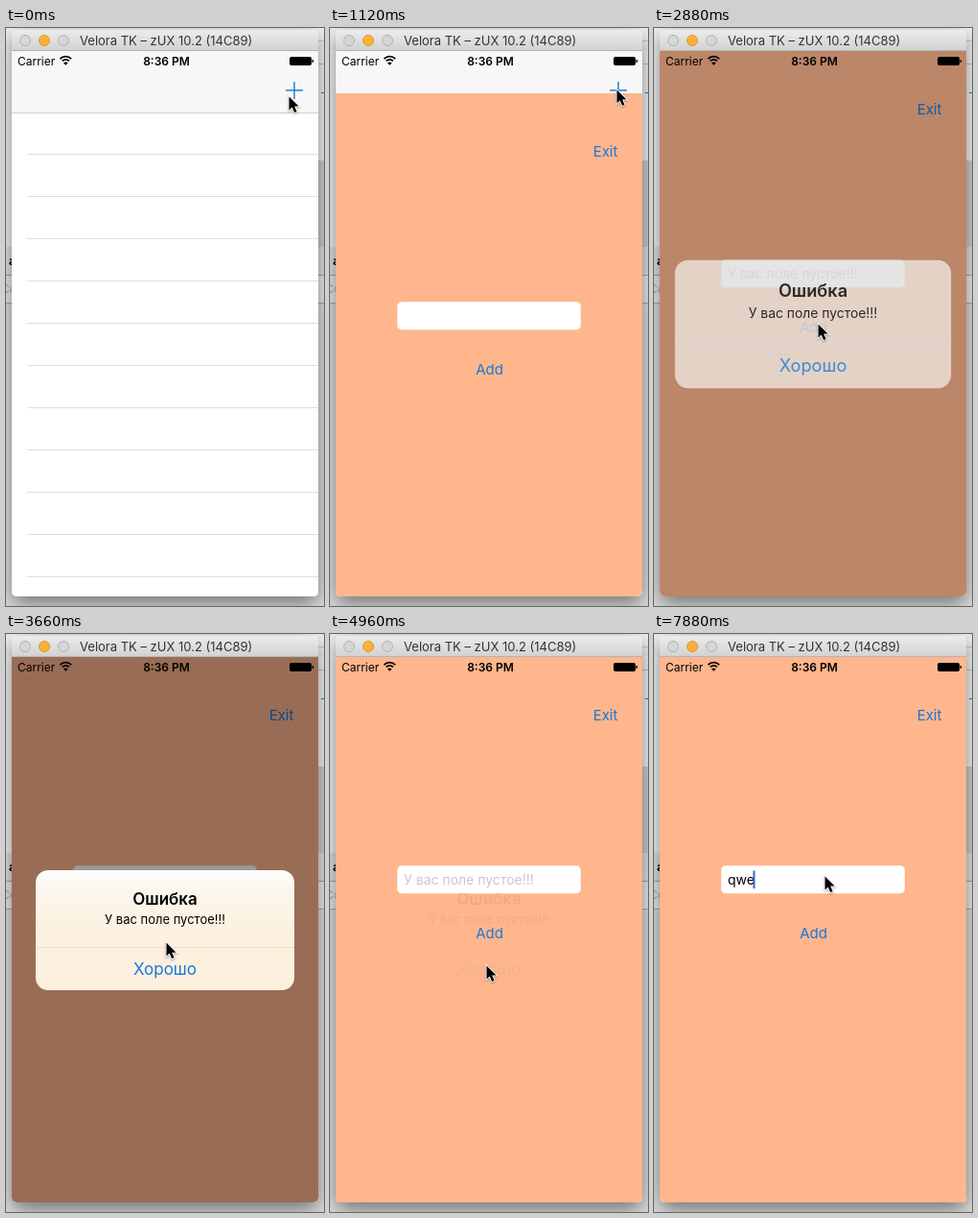
An HTML page with a canvas for the animation above (8000 ms loop, 332 px wide and 602 px high).

```html
<!DOCTYPE html>
<html lang="en">
<head>
<meta charset="utf-8">
<title>Empty field alert</title>
<style>
  html, body { margin: 0; width: 100%; height: 100%; overflow: hidden; }
  canvas { display: block; }
</style>
</head>
<body>
<canvas id="stage" width="332" height="602"></canvas>
<script>
const ctx = document.getElementById('stage').getContext('2d');
const LOOP = 8000;
const BLUE = '#1878d8';
const EMPTY_MESSAGE = 'У вас поле пустое!!!';

// Pointer stops: time, x, y
const POINTER = [
  [40, 295, 71], [140, 299, 64], [1130, 299, 64], [2200, 171, 308],
  [3300, 171, 308], [3660, 167, 321], [4250, 163, 351], [4620, 163, 351],
  [4900, 163, 345], [5100, 163, 345], [6060, 178, 252]
];

const clamp = v => Math.max(0, Math.min(1, v));

// Remaining distance of a critically damped spring released at `start`
function spring(t, start, rate) {
  const x = Math.max(0, t - start) / 1000 * rate;
  return (1 + x) * Math.exp(-x);
}

// Button opacity: dims on press, fades back after release
function pressed(t, down, up) {
  return t < down ? 1 : 0.2 + 0.8 * clamp((t - up) / 400);
}

function rect(x, y, w, h, color) {
  ctx.fillStyle = color;
  ctx.fillRect(x, y, w, h);
}

function rounded(x, y, w, h, r, color) {
  ctx.beginPath();
  ctx.roundRect(x, y, w, h, r);
  ctx.fillStyle = color;
  ctx.fill();
}

function text(str, x, y, size, { color = '#000', weight = 400, align = 'center' } = {}) {
  ctx.font = `${weight} ${size}px Inter, Roboto, sans-serif`;
  ctx.textAlign = align;
  ctx.fillStyle = color;
  ctx.fillText(str, x, y);
}

function gradient(y0, y1, ...colors) {
  const g = ctx.createLinearGradient(0, y0, 0, y1);
  colors.forEach((c, i) => g.addColorStop(i / (colors.length - 1), c));
  return g;
}

function faded(alpha, draw) {
  ctx.save();
  ctx.globalAlpha *= alpha;
  draw();
  ctx.restore();
}

function drawDesktop() {
  rect(0, 0, 332, 602, '#e2e2e2');
  rect(0, 0, 332, 23, '#f0f0f0');
  rect(0, 23, 332, 205, '#f8f8f8');
  rect(0, 228, 332, 30, '#e6e6e6');
  rect(0, 258, 332, 28, '#f0f0f0');
  rect(326, 138, 6, 90, '#d2d2d2');
  for (const y of [257, 286]) rect(0, y, 332, 1, '#aaa');
  for (const y of [13, 37]) rect(326, y, 6, 1, '#c4c4c4');
  rect(329, 67, 3, 1, BLUE);

  ctx.save();
  ctx.shadowColor = 'rgba(0,0,0,.5)';
  ctx.shadowBlur = 22;
  ctx.shadowOffsetY = 8;
  rounded(6, 2, 320, 590, 5, '#fff');
  ctx.restore();
  text('a', 3, 247, 12, { weight: 700, align: 'left' });
  text('Co', -5, 276, 12, { color: '#888', align: 'left' });
}

function drawTitleBar() {
  rect(6, 2, 320, 22, gradient(2, 23, '#ececec', '#d2d2d2'));
  rect(6, 23, 320, 1, '#b4b4b4');
  ['#d6d6d6', '#fbb03b', '#d6d6d6'].forEach((color, i) => {
    ctx.beginPath();
    ctx.arc(20 + 20 * i, 13, 5.5, 0, Math.PI * 2);
    ctx.fillStyle = color;
    ctx.fill();
    ctx.strokeStyle = i === 1 ? '#dc9630' : '#b2b2b2';
    ctx.lineWidth = 1;
    ctx.stroke();
  });
  text('Velora TK – zUX 10.2 (14C89)', 77, 18, 13, { color: '#333', align: 'left' });
}

function drawStatusBar() {
  text('Carrier', 12, 38.5, 12, { align: 'left' });
  text('8:36 PM', 167.5, 38.5, 12, { weight: 600 });

  ctx.strokeStyle = '#000';
  ctx.lineWidth = 1.8;
  for (const r of [5, 8.3]) {
    ctx.beginPath();
    ctx.arc(62.3, 38, r, -Math.PI * 0.75, -Math.PI * 0.25);
    ctx.stroke();
  }
  ctx.beginPath();
  ctx.moveTo(62.3, 38.8);
  ctx.arc(62.3, 38.8, 3.2, -Math.PI * 0.75, -Math.PI * 0.25);
  ctx.fillStyle = '#000';
  ctx.fill();

  rounded(296, 30, 23, 9, 2, '#000');
  rounded(319.5, 33, 1.5, 3, 0.7, '#000');
}

function drawList(t) {
  rect(6, 24, 320, 568, '#fff');
  rect(6, 24, 320, 64, '#f7f7f7');
  rect(6, 88, 320, 1, '#d0d0d0');
  for (let y = 131; y < 592; y += 44) rect(22, y, 304, 1, '#dfdfe1');
  faded(pressed(t, 280, 700), () => {
    rect(292, 64.2, 18, 1.4, BLUE);
    rect(300.3, 56, 1.4, 18, BLUE);
  });
}

function drawField(t) {
  rounded(70, 241, 192, 29.5, 5, '#ffdcc8');
  rounded(70.5, 241.5, 191, 28.5, 4.5, '#fff');

  const typed = 'qwe'.slice(0, Math.max(0, Math.ceil((t - 7639) / 80)));
  if (typed) text(typed, 77, 260.5, 14, { align: 'left' });
  else if (t >= 2655) text(EMPTY_MESSAGE, 77, 260.5, 14, { color: '#c7c7cd', align: 'left' });

  if (t >= 6500) {
    const caretX = 77 + (typed ? ctx.measureText(typed).width - 1.5 : 0);
    const alpha = typed ? 1 : 1 - clamp((t - 7000) / 240);
    faded(alpha, () => rect(caretX, 246.5, 2, 18.5, '#3a62c4'));
  }
}

function drawSheet(t) {
  ctx.save();
  ctx.translate(0, 569 * spring(t, 700, 10));
  rect(6, 24, 320, 570, '#ffb68d');
  text('Exit', 287.5, 90, 15, { color: BLUE });
  drawField(t);
  faded(pressed(t, 2360, 2655), () => text('Add', 166.5, 317, 15, { color: BLUE }));
  ctx.restore();
}

function drawAlert(shown, scale) {
  const settled = shown > 0.99;
  ctx.save();
  ctx.translate(166, 308.5);
  ctx.scale(scale, scale);
  ctx.translate(-166, -308.5);
  faded(shown, () => {
    rounded(31, 246, 270, 125, 13,
      settled ? gradient(246, 371, '#fdfcfa', '#fbf5e9', '#fcf1e0', '#fcf0df', '#fbefde') : '#f9f9f9');
    rect(31, 326, 270, 1, settled ? '#f6d9c0' : '#dcd8d5');
  });
  faded(Math.sqrt(shown), () => {
    text('Ошибка', 166, 282, 17, { weight: 600 });
    text(EMPTY_MESSAGE, 166, 302, 13);
    text('Хорошо', 166, 355, 17, { color: BLUE });
  });
  ctx.restore();
}

function drawPointer(t) {
  let [, x, y] = POINTER[0];
  for (let i = 1; i < POINTER.length; i++) {
    const [t0, x0, y0] = POINTER[i - 1];
    const [t1, x1, y1] = POINTER[i];
    if (t < t0) break;
    const k = 1 - (1 - clamp((t - t0) / (t1 - t0))) ** 2;
    x = x0 + (x1 - x0) * k;
    y = y0 + (y1 - y0) * k;
  }
  ctx.save();
  ctx.translate(x, y);
  const arrow = new Path2D('M.5 .5V14.5L3.7 11.5L6.1 17L8.6 15.9L6.2 10.6H10.6Z');
  ctx.shadowColor = 'rgba(0,0,0,.35)';
  ctx.shadowBlur = 2;
  ctx.shadowOffsetY = 1;
  ctx.strokeStyle = '#fff';
  ctx.lineWidth = 1.8;
  ctx.stroke(arrow);
  ctx.shadowColor = 'transparent';
  ctx.fillStyle = '#000';
  ctx.fill(arrow);
  ctx.restore();
}

function draw(t) {
  drawDesktop();
  ctx.save();
  ctx.beginPath();
  ctx.roundRect(6, 2, 320, 590, 5);
  ctx.clip();
  drawList(t);
  drawSheet(t);

  const entering = spring(t, 2655, 10);
  const shown = t < 4525 ? 1 - entering : spring(t, 4525, 18);
  drawTitleBar();
  faded(0.4 * shown, () => rect(6, 24, 320, 568, '#000'));
  drawStatusBar();
  if (shown > 0.003) drawAlert(shown, 1 + 0.2 * entering);
  ctx.restore();
  drawPointer(t);
}

const start = performance.now();
function tick() {
  draw((performance.now() - start) % LOOP);
  requestAnimationFrame(tick);
}
tick();
</script>
</body>
</html>
```
